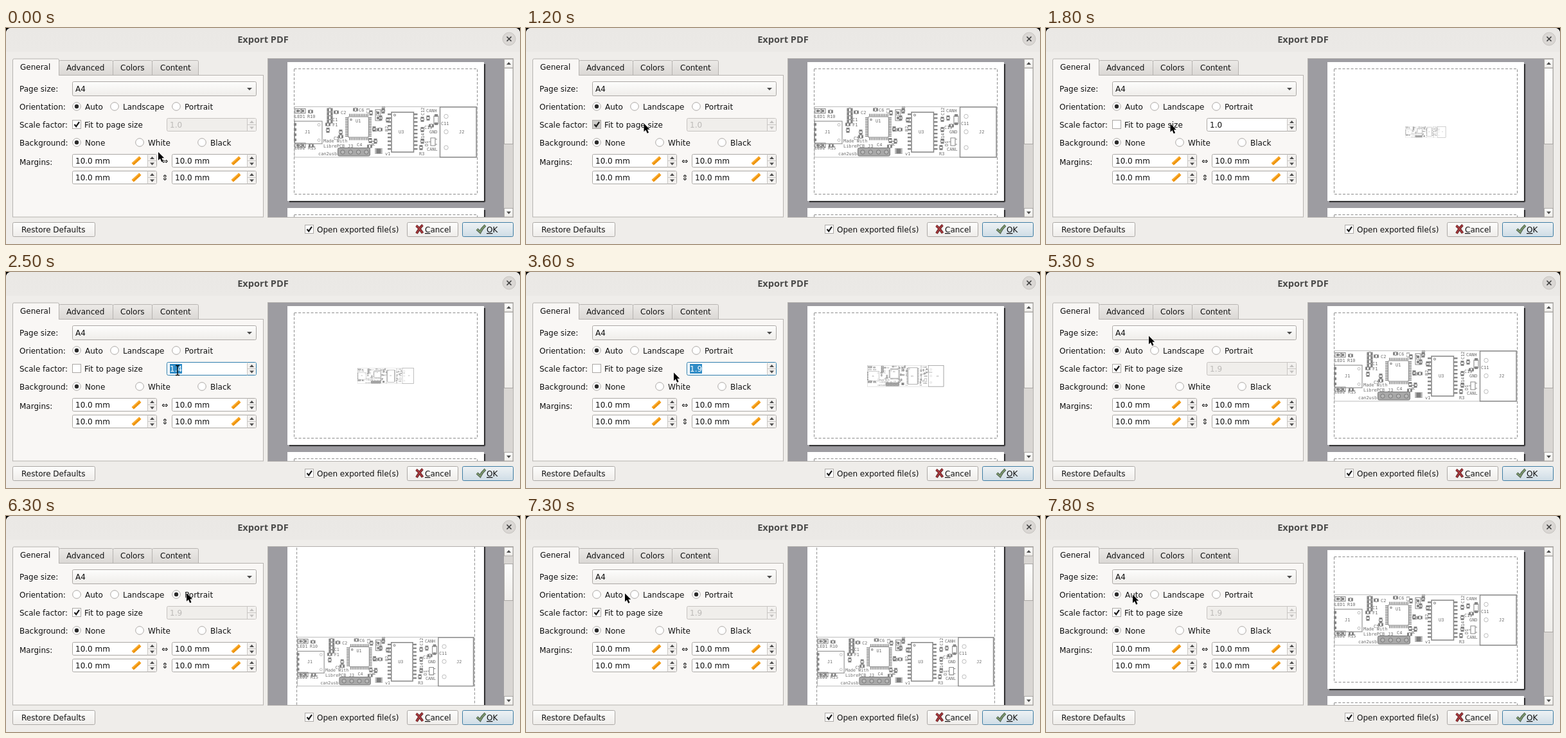
An HTML page that plays this animation: 800 px wide and 336 px high, repeating every 8 s.

```html
<!DOCTYPE html>
<html lang="en">
<head>
<meta charset="utf-8">
<title>Export PDF</title>
<style>
  html, body { margin: 0; width: 800px; height: 336px; overflow: hidden; background: #000; }
  svg { display: block; font: 12px "DejaVu Sans", sans-serif; }
  text { fill: #111; white-space: pre; }
  .title { font: 700 14.6px "Noto Sans", sans-serif; fill: #4b4b4a; text-anchor: middle; }
  .key { text-decoration: underline; }
  .box { fill: #fff; stroke: #aba8a5; }
  .ctl { fill: url(#btn); stroke: #aba8a5; }
  .arrow { fill: #4c4c4c; }
  .off .box { fill: #f0eeeb; stroke: #c6c3c0; }
  .off text { fill: #bcbab8; }
  .off .arrow { fill: #c2c0be; }
  .focus .box { stroke: #2f7eae; }
  .focus .val { fill: #fff; }
  .sel { fill: #308cc6; visibility: hidden; }
  .focus .sel { visibility: visible; }
  .tick { fill: none; stroke: #1c1c1c; stroke-width: 2.2; }
  .dash { fill: none; stroke: #8d8d8d; stroke-dasharray: 4 2.5; }
  #board text { font: 6.9px "DejaVu Sans Mono", monospace; fill: #6c6c6c; }
  #board .ol { fill: none; stroke: #8a8a8a; stroke-width: 1.1; }
  #board .pad { fill: #858585; }
  #board .faint { fill: none; stroke: #bcbcbc; }
</style>
</head>
<body>
<svg id="stage" width="800" height="336" viewBox="0 0 800 336"></svg>
<script>
const rect = (x, y, w, h, attrs = '') =>
  `<rect x="${x}" y="${y}" width="${w}" height="${h}" ${attrs}/>`;
const text = (x, y, s, attrs = '') => `<text x="${x}" y="${y}" ${attrs}>${s}</text>`;
const path = (d, attrs = '') => `<path d="${d}" ${attrs}/>`;
const circle = (x, y, r, attrs = '') => `<circle cx="${x}" cy="${y}" r="${r}" ${attrs}/>`;
const range = (n, f) => Array.from({ length: n }, (_, i) => f(i)).join('');

// Form controls
const arrow = (x, y, up, r = 3.5) =>
  path(`M${x - r} ${y + (up ? 2 : -2)}h${2 * r}l${-r} ${up ? -4 : 4}z`, 'class="arrow"');

const radio = (x, y, label, id = '', on = true) =>
  circle(x, y, 6.3, `class="box" ${id && `id="${id}Ring"`}`) +
  (on ? circle(x, y, 3.2, `fill="#2a2a2a" ${id && `id="${id}Dot"`}`) : '') +
  text(x + 13, y + 5, label);

const check = (x, y, label, id) =>
  rect(x, y, 13, 13, `class="box" id="${id}Box"`) +
  path(`M${x + 3} ${y + 6.5}l2.7 3.2l4.8-7`, `class="tick" id="${id}Tick"`) +
  text(x + 18.5, y + 11.5, label);

const spin = (x, y, w, body) =>
  rect(x, y, w, 20, 'rx="2" class="box"') + body +
  path(`M${x + w - 14} ${y + .5}v19h12.5a1 1 0 0 0 1-1v-17a1 1 0 0 0-1-1z`, 'fill="#f3f1ef"') +
  path(`M${x + w - 14} ${y}v20M${x + w - 14} ${y + 10}h14`, 'stroke="#c9c6c3"') +
  arrow(x + w - 7, y + 5.5, true) + arrow(x + w - 7, y + 15, false);

const ruler = (x, y) =>
  `<g transform="translate(${x} ${y}) rotate(-43)">` +
  rect(-8, -2.4, 16, 4.8, 'rx=".5" fill="#f49a12"') +
  path('M-7-1.4h14', 'stroke="#ffbb48"') +
  path('M-5 2.2v-2M-2 2.2v-2M1 2.2v-2M4 2.2v-2', 'stroke="#c97504" stroke-width=".8"') + '</g>';

const margin = (x, y) => spin(x, y, 131, text(x + 4.5, y + 14.5, '10.0 mm') + ruler(x + 99.5, y + 10));

const tab = (x, w, label, textX) =>
  path(`M${x} 73V52.5a2 2 0 0 1 2-2h${w - 4}a2 2 0 0 1 2 2V73`, 'fill="url(#tab)" stroke="#b6b3b0"') +
  text(textX, 66, label);

const keyed = (x, y, s) => text(x, y, `<tspan class="key">${s[0]}</tspan>${s.slice(1)}`);

// Icon stroke with a dark rim
const brush = (d, rim, fill) =>
  path(d, `fill="none" stroke="${rim}" stroke-width="4"`) +
  path(d, `fill="none" stroke="${fill}" stroke-width="2.2"`);

// Circuit board
const part = (x, y, upright, size = 1) =>
  `<g transform="translate(${x} ${y}) rotate(${upright ? 90 : 0}) scale(${size})">` +
  rect(-4, -2.5, 3, 5, 'class="pad"') + rect(1, -2.5, 3, 5, 'class="pad"') +
  path('M-1.5-2.5h3M-1.5 2.5h3', 'class="ol"') + '</g>';
const label = (s, x, y, upright) =>
  text(x, y, s, upright ? `transform="rotate(-90 ${x} ${y})"` : '');
const led = (x, y) =>
  rect(x, y, 16, 7, 'class="ol"') + rect(x + 2, y + 1.5, 4, 4, 'class="pad"') +
  rect(x + 10, y + 1.5, 4, 4, 'class="pad"') + path(`M${x + 6} ${y + 3.5}l4-2.5v5z`, 'class="ol"');

function board() {
  const flat = [[474, 130], [475, 183], [501, 150], [514, 131],
    [544, 127], [566, 184], [521, 169], [662, 152], [582, 158]];
  const tall = [[501, 159], [521, 162], [568, 132], [573, 157], [583, 140], [587, 129],
    [594, 143], [575, 176], [648, 142], [648, 158], [648, 176], [657, 140], [646, 186], [567, 175]];
  const names = [['LED1', 449, 140], ['R10', 469, 140], ['LED2', 449, 189], ['R15', 470, 189],
    ['C2', 521, 134], ['C1', 508, 145], ['F1', 508, 153], ['C6', 549, 130], ['C5', 510, 174],
    ['U1', 544, 147], ['J1', 465, 164], ['Made With', 494, 178], ['LibrePCB', 494, 186],
    ['J3', 532, 186], ['can2usb', 486, 198], ['C4', 546, 184], ['C9', 570, 161], ['U3', 611, 164],
    ['v1', 590, 198], ['R3', 643, 198], ['CANH', 654, 131], ['CANL', 655, 191], ['GND', 659, 164],
    ['C13', 651, 157], ['C11', 677, 151], ['J2', 705, 164]];
  const upright = [['C3', 566, 133], ['C7', 581, 137], ['C8', 590, 130], ['R2', 595, 161],
    ['C12', 651, 136], ['C14', 651, 176], ['D1', 657, 184], ['R1', 574, 183]];
  return rect(449, 122.5, 284, 78.5, 'class="faint"') +
    led(450, 125.5) + led(450, 179) +
    rect(449.5, 145, 42.5, 35, 'class="ol"') + circle(487, 150.5, 2, 'class="faint"') +
    circle(487, 174.5, 2, 'class="faint"') + range(4, i => rect(448, 148 + i * 8, 4, 4, 'class="pad"')) +
    range(4, i => part(504, 127.5 + i * 6, false, 1.15)) +
    rect(532.5, 138, 32, 32, 'rx="2" class="ol"') + circle(537, 142.5, 1.3, 'class="ol"') +
    range(12, i => {
      const o = 2.6 * i;
      return rect(534 + o, 133.5, 1.4, 4, 'class="pad"') + rect(534 + o, 170.5, 1.4, 4, 'class="pad"') +
        rect(528, 139 + o, 4, 1.4, 'class="pad"') + rect(565, 139 + o, 4, 1.4, 'class="pad"');
    }) +
    rect(600, 131, 34.5, 62, 'class="ol" style="stroke-width:1.6"') + circle(605, 135.5, 1.5, 'class="ol"') +
    range(10, i => rect(594, 133 + i * 6, 5.5, 2.4, 'class="pad"') + rect(635, 133 + i * 6, 5.5, 2.4, 'class="pad"')) +
    rect(675.5, 123, 56.5, 78, 'class="ol" style="stroke-width:1.4"') +
    [137.5, 161.5, 186].map(y => circle(685, y, 3.2, 'class="faint"')).join('') +
    rect(516.5, 186.5, 50, 12.5, 'rx="2" fill="#a8a8a8" stroke="#777"') +
    range(4, i => circle(524 + i * 12.3, 193, 3.2, 'fill="#b8b8b8" stroke="#777"')) +
    rect(576.5, 187.5, 7, 8, 'fill="#777"') +
    range(4, i => rect(574, 187.5 + i * 2.2, 12, 1.2, 'class="pad"')) +
    rect(575, 127, 8, 17, 'class="ol"') + rect(666, 137, 7, 12, 'class="ol"') +
    rect(577, 130, 4, 4, 'class="pad"') + rect(577, 138, 4, 4, 'class="pad"') +
    rect(667, 134, 5, 4, 'class="pad"') + rect(667, 147, 5, 4, 'class="pad"') +
    path('M661 171h7v12h-7zM658 177h3M668 173h3M668 181h3', 'class="ol"') +
    flat.map(p => part(...p)).join('') + tall.map(p => part(...p, true)).join('') +
    names.map(n => label(...n)).join('') + upright.map(n => label(...n, true)).join('');
}

// Page with dashed margins and a fading shadow
const sheet = (y, h, gap) =>
  rect(438, y, 306, h, 'fill="#fff"') + rect(744, y + 3, 3, h - 3, 'fill="url(#fadeX)"') +
  rect(441, y + h, 303, 3, 'fill="url(#fadeY)"') + rect(744, y + h, 3, 3, 'fill="url(#fadeXY)"') +
  rect(438 + gap, y + gap, 306 - 2 * gap, h - 2 * gap, 'class="dash"');

const gradient = (id, from, to) =>
  `<linearGradient id="${id}" x2="0" y2="1"><stop stop-color="${from}"/><stop offset="1" stop-color="${to}"/></linearGradient>`;
const fade = (id, kind, attrs) =>
  `<${kind}Gradient id="${id}" ${attrs}><stop/><stop offset="1" stop-opacity="0"/></${kind}Gradient>`;

document.getElementById('stage').innerHTML =
  '<defs>' + gradient('btn', '#fdfdfc', '#efedea') + gradient('tab', '#eceae7', '#dbd8d5') +
  gradient('head', '#eae8e5', '#ebe9e6') + gradient('ok', '#eef2f4', '#cfdde6') +
  fade('fadeX', 'linear', '') + fade('fadeY', 'linear', 'x2="0" y2="1"') +
  fade('fadeXY', 'radial', 'cx="0" cy="0" r="1"') +
  '<clipPath id="view">' + rect(408, 48, 367, 246) + '</clipPath></defs>' +
  // window
  path('M0 336V8a8 8 0 0 1 8-8H792a8 8 0 0 1 8 8V336z', 'fill="#efedea"') +
  path('M0 37V8a8 8 0 0 1 8-8H792a8 8 0 0 1 8 8V37z', 'fill="url(#head)"') +
  text(400, 23, 'Export PDF', 'class="title"') +
  circle(783, 17, 10, 'fill="#dad7d4" stroke="#c6c3bf"') +
  path('M779.5 13.5l7 7m0-7l-7 7', 'stroke="#3c3c3c" stroke-width="1.6"') +
  // tabs
  tab(82.5, 84, 'Advanced', 94) + tab(166.5, 61, 'Colors', 178) + tab(227.5, 72, 'Content', 240) +
  rect(10.5, 73.5, 390, 220.5, 'fill="#f9f7f5" stroke="#b6b3b0"') +
  path('M10.5 75V50a2 2 0 0 1 2-2H80.5a2 2 0 0 1 2 2V74', 'fill="#f9f7f5" stroke="#b6b3b0"') +
  rect(11, 73, 71, 2, 'fill="#f9f7f5"') + text(22, 65, 'General') +
  // form
  text(21, 99, 'Page size:') + rect(103.5, 83.5, 286, 22, 'rx="2" class="ctl"') +
  text(108, 99, 'A4') + arrow(379, 95, false, 4) +
  text(21, 127, 'Orientation:') + radio(110, 122, 'Auto', 'auto') +
  radio(169, 122, 'Landscape', '', false) + radio(265, 122, 'Portrait', 'port') +
  text(21, 155, 'Scale factor:') + check(103.5, 143.5, 'Fit to page size', 'fit') +
  '<g id="scale">' + spin(250.5, 140.5, 139, rect(255, 143, 19, 15, 'class="sel"') +
    text(255, 155, '', 'class="val" id="value"')) + '</g>' +
  text(21, 183, 'Background:') + radio(110, 178, 'None') +
  radio(208, 178, 'White', '', false) + radio(305, 178, 'Black', '', false) +
  text(21, 213, 'Margins:') +
  [196.5, 222.5].map(y => margin(103.5, y) + margin(258.5, y)).join('') +
  text(242, 211, '⇔') + text(247, 237, '⇕', 'text-anchor="middle"') +
  // preview
  rect(407.5, 47.5, 382, 247, 'fill="#9d9ca1" stroke="#b3b0ad"') +
  '<g clip-path="url(#view)"><g id="wide">' + sheet(53, 216, 10.5) + sheet(280, 216, 10.5) + '</g>' +
  '<g id="high">' + sheet(10, 433, 14.6) + '</g><g id="board">' + board() + '</g></g>' +
  rect(775, 48, 14, 246, 'fill="#d9d6d3"') +
  rect(775.5, 48.5, 13.5, 13.5, 'class="ctl"') + rect(775.5, 280.5, 13.5, 13.5, 'class="ctl"') +
  arrow(782.5, 55, true) + arrow(782.5, 287.5, false) +
  rect(775.5, 62.5, 13.5, 118, 'id="thumb" class="ctl"') +
  // buttons
  rect(10.5, 302.5, 128, 22, 'rx="2" class="ctl"') + text(24, 318, 'Restore Defaults') +
  check(465.5, 306.5, 'Open exported file(s)', 'open') +
  rect(624.5, 302.5, 79, 22, 'rx="2" class="ctl"') +
  brush('M638.5 307.5c4 3 7 7 10 11.5M648.5 306.5c-3.5 3-6 7-9.5 13', '#5a2426', '#a8383c') +
  keyed(652, 318, 'Cancel') +
  rect(710.5, 302.5, 79, 22, 'rx="2" fill="url(#ok)" stroke="#3d7ca3"') +
  brush('M733 313l5 4.5c2-4.5 4.5-7.5 8-10.5', '#4b5a4c', '#7d9a6c') +
  keyed(748, 318, 'OK') +
  // pointers
  path('M0 0V12.7L3 10L5.2 15.3L7.5 14.3L5.3 9.2H9.2z',
    'id="pointer" stroke="#fff" stroke-width=".6" paint-order="stroke"') +
  path('M-3-7.5h2l1 1l1-1h2M0-6.5v13M-3 7.5h2l1-1l1 1h2',
    'id="beam" fill="none" stroke="#000" stroke-width="1.3"');

const $ = id => document.getElementById(id);
const show = (id, on) => $(id).setAttribute('visibility', on ? 'visible' : 'hidden');
const place = (id, x, y, s = 1) => $(id).setAttribute('transform', `translate(${x} ${y}) scale(${s})`);
const press = (id, on) => $(id).style.fill = on ? '#cfcdca' : '';

const LOOP = 8000, TICK = 100;
// start time, number of ticks, end x, end y
const moves = [[400, 6, 183.5, 148.5], [1800, 6, 267, 153], [3400, 3, 230, 156.5], [3700, 4, 177, 156],
  [4700, 7, 160, 99.5], [5500, 7, 281, 120], [6500, 9, 154, 120.5], [7400, 3, 135, 122.5]];
const values = [[0, '1.0'], [2400, '1.2'], [2500, '1.4'], [2900, '1.7'], [3000, '1.9']];

function pointerAt(t) {
  let x = 237, y = 193;
  for (const [start, ticks, endX, endY] of moves) {
    if (t < start) break;
    const p = Math.min(1, ((t - start) / TICK + 1) / ticks);
    const e = (p + p * p * (3 - 2 * p)) / 2;
    x += (endX - x) * e;
    y += (endY - y) * e;
  }
  return [x, y];
}

function draw(t) {
  const within = (a, b) => t >= a && t < b;
  const fit = !within(1400, 4300), portrait = within(6300, 7800);
  const value = values.filter(v => t >= v[0]).pop()[1];

  const [x, y] = pointerAt(t);
  const beam = !fit && x > 250 && y > 140 && y < 161;
  place('pointer', x, y);
  place('beam', x, y);
  show('pointer', !beam);
  show('beam', beam);

  $('value').textContent = value;
  $('scale').setAttribute('class', fit ? 'off' : within(2400, 4300) ? 'focus' : '');
  show('fitTick', fit);
  press('fitBox', within(1200, 1400) || within(4200, 4300));
  show('autoDot', !portrait);
  show('portDot', portrait);
  press('autoRing', within(7600, 7800));
  press('portRing', within(6100, 6300));

  show('wide', !portrait);
  show('high', portrait);
  const s = !fit ? value * 0.22 : portrait ? 0.968 : 1;
  const cy = portrait ? 226.5 : 161.7;
  place('board', 591 - 591 * s, cy - 161.7 * s, s);
  $('thumb').setAttribute('y', portrait ? 74.5 : 62.5);
  $('thumb').setAttribute('height', portrait ? 57 : 118);
}

function loop() {
  const t = performance.now() % LOOP;
  draw(Math.floor(t / TICK) * TICK);
  requestAnimationFrame(loop);
}
loop();
</script>
</body>
</html>
```
